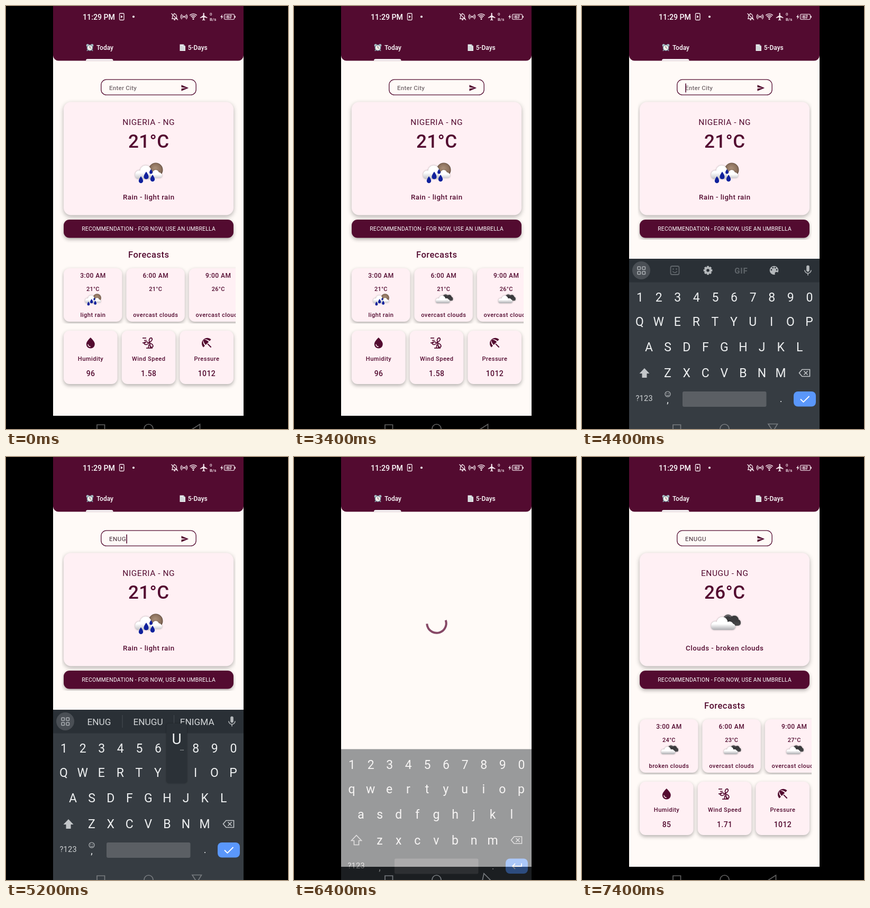
Write an HTML page with a canvas that moves like this. It is 533 px wide and 800 px high and loops after 8 s.

```html
<!DOCTYPE html>
<html lang="en">
<head>
<meta charset="utf-8">
<title>Weather</title>
<style>
html, body { margin: 0; width: 100%; height: 100%; overflow: hidden; background: #000; }
canvas { display: block; width: 533px; height: 800px; }
</style>
</head>
<body>
<canvas id="stage"></canvas>
<script>
const W = 533, H = 800, LOOP = 8000, STEP = 100;
const WINE = '#530b30', PINK = '#fff0f4', PAGE = '#fffaf7';
const KEYS = '#363c42', STRIP = '#2a3036', INK = '#eef0f1';
const MID = 269.5, LEFT = 89, WIDE = 360, FLOOR = 775;
const dpr = window.devicePixelRatio || 1;

const stage = document.getElementById('stage');
const sheet = document.createElement('canvas');
for (const c of [stage, sheet]) {
  c.width = W * dpr;
  c.height = H * dpr;
  c.getContext('2d').scale(dpr, dpr);
}
const main = stage.getContext('2d'), board = sheet.getContext('2d');
let g = main;

const clamp = v => Math.max(0, Math.min(1, v));

function text(s, x, y, size, o = {}) {
  g.font = `${o.weight || 400} ${size}px Roboto, "Open Sans", sans-serif`;
  g.letterSpacing = (o.gap || 0) + 'px';
  g.textAlign = o.align || 'center';
  g.fillStyle = o.color || WINE;
  g.fillText(s, x + (g.textAlign === 'center' ? (o.gap || 0) / 2 : 0), y);
  g.letterSpacing = '0px';
}

function box(x, y, w, h, r, color) {
  g.fillStyle = color;
  g.beginPath();
  g.roundRect(x, y, w, h, r);
  g.fill();
}

function disc(x, y, r, color) {
  g.fillStyle = color;
  g.beginPath();
  g.arc(x, y, r, 0, 7);
  g.fill();
}

function line(color, width, ...pts) {
  g.strokeStyle = color;
  g.lineWidth = width;
  g.beginPath();
  for (const [x, y] of pts) g.lineTo(x, y);
  g.stroke();
}

function ring(x, y, r, color, width, a = 0, b = 2 * Math.PI) {
  g.strokeStyle = color;
  g.lineWidth = width;
  g.beginPath();
  g.arc(x, y, r, a, b);
  g.stroke();
}

function frame(x, y, w, h, r, color, width) {
  g.strokeStyle = color;
  g.lineWidth = width;
  g.beginPath();
  g.roundRect(x, y, w, h, r);
  g.stroke();
}

function glyph(d, cx, cy, scale, color) {
  g.save();
  g.translate(cx, cy);
  g.scale(scale, scale);
  g.translate(-12, -12);
  g.fillStyle = color;
  g.fill(new Path2D(d));
  g.restore();
}

function card(x, y, w, h, r, color = PINK, blur = 7) {
  g.save();
  g.shadowColor = 'rgba(0,0,0,.3)';
  g.shadowBlur = blur * dpr;
  g.shadowOffsetY = 3 * dpr;
  box(x, y, w, h, r, color);
  g.restore();
}

// ---- weather pictures, in a unit of the large size ----

function cloud(circles, base, top, bottom, dark, light) {
  const fill = g.createLinearGradient(0, top, 0, bottom);
  fill.addColorStop(0, light);
  fill.addColorStop(.55, light);
  fill.addColorStop(1, dark);
  g.save();
  g.shadowColor = 'rgba(0,0,0,.35)';
  g.shadowBlur = 3 * dpr;
  g.fillStyle = fill;
  g.beginPath();
  for (const [x, y, r] of circles) {
    g.moveTo(x + r, y);
    g.arc(x, y, r, 0, 2 * Math.PI);
  }
  g.roundRect(...base);
  g.fill();
  g.restore();
}

function drop(x, y, s) {
  g.fillStyle = '#10219c';
  g.beginPath();
  g.moveTo(x, y - 1.9 * s);
  g.quadraticCurveTo(x + s, y - .5 * s, x + s, y + .2 * s);
  g.arc(x, y + .2 * s, s, 0, Math.PI);
  g.quadraticCurveTo(x - s, y - .5 * s, x, y - 1.9 * s);
  g.fill();
}

function rain() {
  const moon = g.createRadialGradient(12, -8, 2, 13, -5, 14);
  moon.addColorStop(0, '#a58a74');
  moon.addColorStop(.75, '#8b705c');
  moon.addColorStop(1, '#5d4a3e');
  disc(13, -5, 13.5, moon);
  cloud([[-6, -3, 10.5], [-18, 4, 8]], [-26, 0, 36, 12, 6], -14, 12, '#c4c4c8', '#fff');
  cloud([[13, 1, 6], [19, 4.5, 5]], [3, 1, 22, 9, 4.5], -5, 10, '#d0d0d4', '#fff');
  drop(-5, 7, 4.6);
  drop(-15, 15, 4.2);
  drop(4, -1, 2.9);
  drop(7, 12, 4.2);
}

function clouds() {
  cloud([[6, -8, 9], [18, -7, 8], [24, -2, 6]], [0, -6, 30, 10, 5], -18, 4, '#4c4c4e', '#3b3b3d');
  ring(6, -8, 7, '#77777a', 1.5, 3.4, 5.6);
  cloud([[-5, -2, 10.5], [-18, 4, 8], [9, 3, 7]], [-26, 0, 46, 12, 6], -13, 12, '#aeaeb2', '#fff');
}

function weather(kind, x, y, scale) {
  g.save();
  g.translate(x, y);
  g.scale(scale, scale);
  (kind === 'rain' ? rain : clouds)();
  g.restore();
}

// ---- header ----

const PLANE = 'M21 16v-2l-8-5V3.5c0-.83-.67-1.5-1.5-1.5S10 2.67 10 3.5V9l-8 5v2l8-2.5V19l-2 1.5V22l3.5-1 3.5 1v-1.5L13 19v-5.5l8 2.5z';
const SEND = 'M2 21L23 12 2 3v7l15 2-15 2z';
const UMBRELLA = 'M13.13 14.56l1.43-1.43 6.44 6.44L19.57 21zM17.42 8.83l2.86-2.86c-3.95-3.95-10.35-3.96-14.3-.02 3.93-1.3 8.31-.25 11.44 2.88zM5.95 5.98c-3.94 3.95-3.93 10.35.02 14.3l2.86-2.86C5.7 14.29 4.65 9.91 5.95 5.98zM5.97 5.96c-.38 3.02 1.16 6.89 4.29 10.03l5.73-5.73c-3.13-3.13-7.01-4.68-10.02-4.3z';

function statusBar() {
  const c = '#f6e9ef';
  text('11:29 PM', 145, 26, 14.2, { weight: 500, align: 'left', color: '#fff' });
  frame(214.5, 14, 8.5, 12.5, 1.5, c, 1.3);
  g.fillStyle = c;
  g.fill(new Path2D('M217 17.5l4 2.8-4 2.8z'));
  disc(241, 20.3, 2, '#fff');

  // muted bell
  g.strokeStyle = c;
  g.lineWidth = 1.3;
  g.stroke(new Path2D('M313 24h11M314.5 24v-4.500a4 4.500 0 0 1 8 0v4.500M318.500 15v-1.500M312.500 14l12.500 12.500'));
  disc(318.5, 26, 1.3, c);

  // hotspot
  disc(336.5, 20.3, 1.7, c);
  for (const r of [3.7, 6.2]) {
    ring(336.5, 20.3, r, c, 1.3, -.85, .85);
    ring(336.5, 20.3, r, c, 1.3, Math.PI - .85, Math.PI + .85);
  }

  for (const r of [4, 7, 10]) ring(354, 25, r, c, 1.6, -2.3, -.84);
  disc(354, 24.6, 1.5, c);
  glyph(PLANE, 374, 20.2, .72, c);
  text('0', 385, 18, 8, { align: 'left', color: c, weight: 500 });
  text('B/s', 385, 27.5, 8, { align: 'left', color: c, weight: 500 });
  g.fillStyle = c;
  g.fill(new Path2D('M409 15.500l-4 5.500h2.500l-1 4.500 4-6h-2.500z'));
  frame(412.5, 15.5, 19, 10, 2.5, c, 1.1);
  box(432.3, 18.5, 1.6, 4, .8, c);
  box(414, 17, 12.5, 7, 1, 'rgba(255,255,255,.25)');
  text('67', 422, 23.8, 8.5, { color: c, weight: 500 });
}

function header() {
  box(LEFT, 0, WIDE, 103.5, [0, 0, 10, 10], WINE);
  statusBar();

  // alarm clock
  line('#8fa4ad', 1.6, [155, 82], [153, 85]);
  line('#8fa4ad', 1.6, [162, 82], [164, 85]);
  disc(154.3, 74.4, 2.6, '#a7bac1');
  disc(162.7, 74.4, 2.6, '#a7bac1');
  disc(158.5, 79, 5.9, '#7d98a4');
  disc(158.5, 79, 4.5, '#f3f0ea');
  line('#6a4a50', 1, [158.5, 75.8], [158.5, 79], [160.8, 80.2]);

  // sheet of paper
  g.fillStyle = '#e6e9ea';
  g.fill(new Path2D('M328.500 72.500h7l3.500 3.500v9h-10.500z'));
  g.fillStyle = '#a9b6bb';
  g.fill(new Path2D('M335.500 72.500l3.500 3.500h-3.500z'));
  for (let i = 0; i < 4; i++) line('#b3bdc1', .8, [330, 76.5 + i * 2], [i ? 337.5 : 334, 76.5 + i * 2]);

  const tab = { weight: 500, align: 'left', color: '#fff' };
  text('Today', 171, 82.5, 12, tab);
  text('5-Days', 343.7, 82.5, 12, tab);
  box(151, 100.3, 51.5, 3.2, [3, 3, 0, 0], '#fff');
}

// ---- today's page ----

const LAGOON = {
  place: 'NIGERIA - NG', temp: '21°C', icon: 'rain', note: 'Rain - light rain',
  hours: [['21°C', 'rain', 'light rain'], ['21°C', 'clouds', 'overcast clouds'], ['26°C', 'clouds', 'overcast clouds']],
  info: ['96', '1.58', '1012']
};
const ENUGU = {
  place: 'ENUGU - NG', temp: '26°C', icon: 'clouds', note: 'Clouds - broken clouds',
  hours: [['24°C', 'clouds', 'broken clouds'], ['23°C', 'clouds', 'overcast clouds'], ['27°C', 'clouds', 'overcast clouds']],
  info: ['85', '1.71', '1012']
};

function field(typed, cursor) {
  frame(179.8, 139.2, 179.4, 29, 10, WINE, 1.3);
  if (typed) text(typed, 195, 159, 11.5, { align: 'left', gap: .5, color: '#3c2530' });
  else text('Enter City', 195, 159, 11.5, { align: 'left', weight: 500, gap: .25, color: '#74696d' });
  if (cursor) {
    g.letterSpacing = '0.5px';
    const w = typed ? g.measureText(typed).width : 0;
    g.letterSpacing = '0px';
    box(195.3 + w, 146.5, 1.6, 17, 0, WINE);
  }
  glyph(SEND, 338, 155, .65, WINE);
}

function windIcon(x, y) {
  line(WINE, 1.7, [x - 11, y - 9], [x - 4, y - 9]);
  line(WINE, 1.7, [x - 8, y - 4.5], [x - 3, y - 4.5]);
  line(WINE, 1.7, [x - 11, y], [x - 5, y]);
  for (const a of [.25, 2.35, 4.45]) {
    g.save();
    g.translate(x + 2, y);
    g.rotate(a);
    g.strokeStyle = WINE;
    g.lineWidth = 1.7;
    g.stroke(new Path2D('M0 -1.500C-3 -5 -2 -9 1 -10C5 -9 4 -4 0 -1.500z'));
    g.restore();
  }
  disc(x + 2, y, 1.8, WINE);
  line(WINE, 1.7, [x + 1, y + 3], [x, y + 10]);
  line(WINE, 1.7, [x + 3, y + 3], [x + 4, y + 10]);
  line(WINE, 1.7, [x - 4, y + 10], [x + 8, y + 10]);
}

function dropIcon(x, y) {
  g.fillStyle = WINE;
  g.beginPath();
  g.moveTo(x, y - 10);
  g.bezierCurveTo(x + 5, y - 5, x + 8, y - 1, x + 8, y + 2.5);
  g.arc(x, y + 2.5, 8, 0, Math.PI);
  g.bezierCurveTo(x - 8, y - 1, x - 5, y - 5, x, y - 10);
  g.fill();
  ring(x, y + 2.5, 4.8, PINK, 1.5, 1.6, 3.1);
}

function forecasts(data, shown) {
  text('Forecasts', MID, 476, 16.5, { weight: 500, gap: .5 });
  g.save();
  g.beginPath();
  g.rect(105, 490, 329, 110.5);
  g.clip();
  data.hours.forEach(([temp, icon, note], i) => {
    const x = 109 + i * 118.4, c = x + 55.2;
    card(x, 496, 110.4, 101, 11);
    text(3 * (i + 1) + ':00 AM', c, 514, 12, { weight: 500, gap: .5 });
    text(temp, c, 539, 11, { weight: 500, gap: .25 });
    if (i < shown) weather(icon, c + .4, 555, .58);
    text(note, c, 588.3, 11.1, { weight: 500, gap: .45 });
  });
  g.restore();

  ['Humidity', 'Wind Speed', 'Pressure'].forEach((label, i) => {
    const x = 109 + i * 109.7, c = x + 50.8;
    card(x, 614, 101.6, 101, 11);
    if (i === 0) dropIcon(c, 637);
    if (i === 1) windIcon(c - .5, 637);
    if (i === 2) glyph(UMBRELLA, c, 637, 1.02, WINE);
    text(label, c, 671, 11.1, { weight: 500, gap: .45 });
    text(data.info[i], c, 700, 14, { weight: 500, gap: .4 });
  });
}

function today(data, s) {
  field(s.typed, s.cursor);
  g.save();
  if (s.open > 0) {
    g.beginPath();
    g.rect(105.5, 104, 328.5, FLOOR - 297 * s.open - 36 - 104);
    g.clip();
  }
  card(109, 181.5, 321, 214, 14, PINK, 9);
  text(data.place, MID, 225, 15.5, { gap: .55 });
  text(data.temp, MID, 268, 35, { weight: 500, gap: .4 });
  if (s.icon) weather(data.icon, 270, 315, 1);
  text(data.note, MID, 365.5, 13.3, { weight: 500, gap: .5 });
  card(109, 404, 321, 34.5, 11, WINE);
  text('RECOMMENDATION - FOR NOW, USE AN UMBRELLA', MID, 425, 10.4, { gap: .25, color: '#fff' });
  forecasts(data, s.shown);
  g.restore();
}

// ---- loading ring ----

function ease(x) {
  // cubic-bezier(.4, 0, .2, 1)
  let u = x;
  for (let i = 0; i < 8; i++) {
    const v = 1 - u;
    const err = 1.2 * v * v * u + .6 * v * u * u + u * u * u - x;
    u = clamp(u - err / (1.2 * v * v - 1.2 * v * u + 1.8 * u * u + .01));
  }
  return 3 * u * u - 2 * u * u * u;
}

function spinner(age, y) {
  const p = age / 1333 % 1;
  const head = ease(clamp(p * 2)), tail = ease(clamp(p * 2 - 1));
  const start = Math.PI * (-.5 + 1.5 * tail + 2 * age / 2222 + .5 * p);
  ring(MID, y, 18.2, '#864866', 4, start, start + Math.max(.05, 1.5 * Math.PI * (head - tail)));
}

// ---- keyboard ----

const ROWS = [['1234567890', 109.5, 551], ['QWERTYUIOP', 109, 597], ['ASDFGHJKL', 126.5, 645], ['ZXCVBNM', 162, 694]];
const PITCH = 35.6;
const HINTS = {
  E: ['E', 'EVERY', 'EVEN'], EN: ['EN', 'END', 'ENJOY'], ENU: ['ENU', 'ENUGU', 'ENOUGH'],
  ENUG: ['ENUG', 'ENUGU', 'ENIGMA'], ENUGU: ['ENUGU', 'ENIGMA', 'ENOUGH']
};

function tools() {
  const dim = '#60666b', lit = '#b4b8bb';
  frame(167.5, 492, 16, 16, 3, dim, 1.8);
  disc(172.5, 497.5, 1.3, dim);
  disc(178.5, 497.5, 1.3, dim);
  ring(175.5, 500, 4.3, dim, 1.6, .3, 2.8);
  for (let i = 0; i < 8; i++) {
    const a = i * Math.PI / 4, c = Math.cos(a), s = Math.sin(a);
    line(lit, 4, [238 + 4 * c, 500 + 4 * s], [238 + 8.3 * c, 500 + 8.3 * s]);
  }
  ring(238, 500, 4.8, lit, 4);
  text('GIF', 300.5, 506, 15, { weight: 700, gap: .8, color: dim });
  disc(363, 500, 8.3, lit);
  disc(367.5, 506, 3, STRIP);
  for (const [x, y] of [[-5, -1], [-2.2, -5], [2.2, -5], [5, -1]]) disc(363 + x, 500 + y, 1.4, STRIP);
}

function strip(typed) {
  box(LEFT, 478, WIDE, 44.5, 0, STRIP);
  disc(112, 500, 17, '#4a4f55');
  for (const x of [105, 114]) for (const y of [493, 502]) frame(x, y, 5.5, 5.5, 1, '#a9adb1', 1.6);
  if (typed) {
    HINTS[typed].forEach((w, i) => text(w, 176 + i * 92.6, 507, 17.2, { color: '#d3d6d8' }));
    for (const x of [220, 317.5]) line('#464c52', 1, [x, 488], [x, 512]);
  } else tools();
  box(424.2, 490.5, 5.6, 12, 2.8, '#b4b8bb');
  ring(427, 499.5, 6, '#b4b8bb', 1.6, 0, Math.PI);
  line('#b4b8bb', 1.6, [427, 505.5], [427, 509.5]);
}

function popup(letter) {
  for (const [keys, x0, y] of ROWS) {
    const i = keys.indexOf(letter);
    if (i < 0) continue;
    const x = x0 + i * PITCH;
    g.save();
    g.shadowColor = 'rgba(0,0,0,.3)';
    g.shadowBlur = 3 * dpr;
    box(x - 19.5, y - 93, 39, 113, 5, '#2b3137');
    g.restore();
    text(letter, x, y - 54, 28, { color: INK });
    text('…', x + 10, y - 42, 12, { color: INK });
  }
}

function keyboard(s) {
  g = board;
  g.clearRect(0, 0, W, H);
  g.save();
  g.translate(0, s.shift);
  box(LEFT, 522, WIDE, 300, 0, KEYS);
  if (s.caps) strip(s.typed);
  for (const [keys, x, y] of ROWS)
    [...(s.caps ? keys : keys.toLowerCase())].forEach((k, i) => text(k, x + i * PITCH, y + 8, 23, { color: INK }));

  const arrow = new Path2D('M118 685l9.500 10h-5v8h-9v-8h-5z');
  g.fillStyle = g.strokeStyle = '#c3c6c9';
  g.lineWidth = 1.6;
  s.caps ? g.fill(arrow) : g.stroke(arrow);
  g.stroke(new Path2D('M416 687.500h14.500v13h-14.500l-5.500-6.500zM419.500 690.500l7 7M426.500 690.500l-7 7'));

  text('?123', 117.5, 747, 14.5, { color: '#d0d3d5', gap: .3 });
  if (s.caps) {
    ring(162, 734, 5, '#c3c6c9', 1.1);
    ring(162, 734.5, 2.5, '#c3c6c9', 1, .2, 2.9);
    disc(160.2, 732.5, .8, '#c3c6c9');
    disc(163.8, 732.5, .8, '#c3c6c9');
  }
  text(',', 162, 751, 18, { color: INK });
  box(190, 729, 158.5, 29, 3, '#5b5f64');
  text('.', 376, 749, 18, { color: INK });
  box(400, 729, 42, 28.5, 8, '#5a97fb');
  if (s.caps) line('#fff', 1.8, [413, 743.5], [418.5, 749], [429.5, 738]);
  else {
    line('#fff', 1.8, [430, 738], [430, 743.5], [413, 743.5]);
    line('#fff', 1.8, [418, 738.5], [413, 743.5], [418, 748.5]);
  }
  if (s.press) popup(s.press);
  g.restore();

  g = main;
  g.save();
  g.globalAlpha = s.alpha;
  g.drawImage(sheet, 0, 0, W, H);
  g.restore();
}

function navBar(open) {
  const c = open > 0 ? '#777b7f' : '#606060';
  frame(172, 792, 14.5, 15, 0, c, 1.7);
  ring(MID, 799.5, 8.5, c, 1.7);
  g.save();
  g.translate(360, 799 - 2 * open);
  g.rotate(-Math.PI / 2 * open);
  g.strokeStyle = c;
  g.lineWidth = 1.7;
  g.stroke(new Path2D('M-7.500 1L6.500 -8V9.500z'));
  g.restore();
}

// ---- timeline ----

const TYPED = [[4600, 'E'], [4800, 'EN'], [5000, 'ENU'], [5100, 'ENUG'], [5300, 'ENUGU']];
const PRESSED = { 4500: 'E', 4700: 'N', 4900: 'U', 5000: 'G', 5200: 'U' };
const SUBMIT = 6200, RESULT = 7000;

function state(t) {
  const rise = 1 - Math.pow(1 - clamp((t - 3400) / 500), 3);
  const fall = clamp((t - 6250) / 300);
  const s = { typed: '', press: PRESSED[t], caps: t <= SUBMIT };
  for (const [at, word] of TYPED) if (t >= at) s.typed = word;
  s.open = t < SUBMIT ? rise : 1 - fall;
  s.alpha = t < SUBMIT ? clamp((t - 3400) / 250) : 1 - fall;
  s.shift = t < SUBMIT ? 61 * (1 - rise) : 61 * fall;
  s.cursor = (t >= 3500 && t < 3900) || (t >= 4400 && t < 5800);
  s.icon = t < SUBMIT || t >= 7200;
  s.shown = t < 100 ? 1 : t < SUBMIT || t >= 7400 ? 3 : 0;
  return s;
}

function draw() {
  const t = Math.floor(performance.now() % LOOP / STEP) * STEP;
  const s = state(t);
  g = main;
  g.fillStyle = '#000';
  g.fillRect(0, 0, W, H);
  box(LEFT, 0, WIDE, FLOOR, 0, PAGE);
  header();
  if (t < SUBMIT) today(LAGOON, s);
  else if (t >= RESULT) today(ENUGU, s);
  else spinner(t - 6090, 290 + 149 * Math.pow(clamp((t - 6250) / 300), 2.6));
  if (s.alpha > 0) keyboard(s);
  navBar(s.open);
  requestAnimationFrame(draw);
}
requestAnimationFrame(draw);
</script>
</body>
</html>
```
